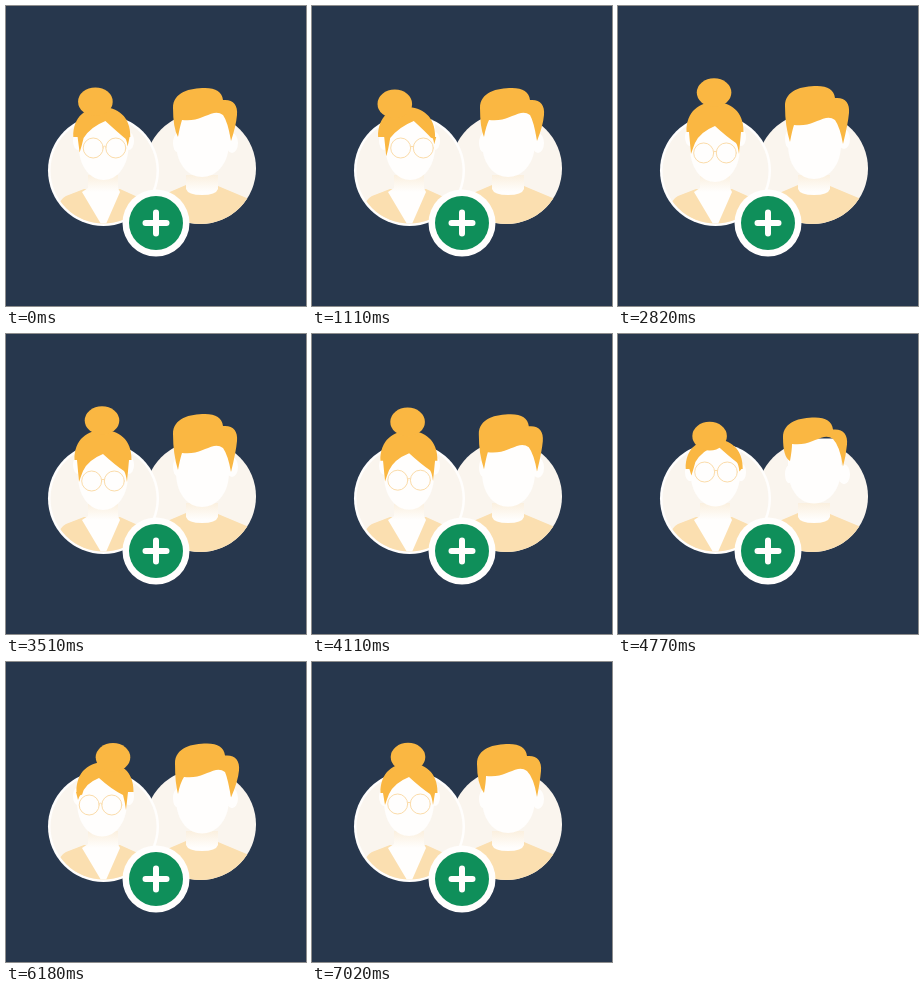
An HTML page with a canvas for the animation above (7.05 s loop, 300 by 300 pixels).

```html
<!DOCTYPE html>
<html lang="en">
<head>
<meta charset="utf-8">
<title>Add people</title>
<style>
html, body { margin: 0; width: 100%; height: 100%; overflow: hidden; background: #27374d; }
canvas { display: block; width: 100vw; height: 100vh; }
</style>
</head>
<body>
<canvas id="stage" width="300" height="300"></canvas>
<script>
const ctx = document.getElementById('stage').getContext('2d');
const LOOP = 7050, STEP = 30;
const WHITE = '#fffefd', CREAM = '#faf5ee', CLOTH = '#fbdfb0', HAIR = '#fab742', GREEN = '#0f8f5a';

// Where the heads point: turn of hers, shared nod (1 is down), turn of his
const looks = [
  { t: 0, her: -.6, nod: 0, his: 0 },
  { t: 1110, her: -1.2, nod: 0, his: .5 },
  { t: 2190, her: 1, nod: -.8, his: -.5 },
  { t: 2850, her: 0, nod: 1, his: 0 },
  { t: 3950, her: 0, nod: 1, his: 0 },
  { t: 4770, her: -.4, nod: -.8, his: -1 },
  { t: 6180, her: 1, nod: .2, his: 1 },
  { t: 7020, her: 0, nod: 0, his: -1 },
];

function lookAt(t) {
  const i = Math.max(1, looks.findIndex(k => k.t >= t));
  const a = looks[i - 1], b = looks[i];
  const e = (1 - Math.cos(Math.PI * (t - a.t) / (b.t - a.t))) / 2;
  const mix = part => a[part] + (b[part] - a[part]) * e;
  return { her: mix('her'), nod: mix('nod'), his: mix('his') };
}

function fill(d, color) {
  ctx.fillStyle = color;
  ctx.fill(new Path2D(d));
}

function oval(x, y, rx, ry, color) {
  ctx.fillStyle = color;
  ctx.beginPath();
  ctx.ellipse(x, y, rx, ry, 0, 0, 7);
  ctx.fill();
}

function disc(x, y, r, drawBody) {
  ctx.save();
  oval(x, y, r, r, CREAM);
  ctx.clip();
  drawBody();
  ctx.restore();
}

function shifted(x, y, draw) {
  ctx.save();
  ctx.translate(x, y);
  draw();
  ctx.restore();
}

// Skin below the chin, shaded at the top
function neckTone() {
  const tone = ctx.createLinearGradient(0, 169, 0, 186);
  tone.addColorStop(0, '#fbf0df');
  tone.addColorStop(1, WHITE);
  return tone;
}

function man(turn, nod) {
  disc(194.5, 162.5, 55.5, () => {
    fill('M180 179 L152 191 Q143 195 140 220 H254 Q250 197 243 193 L212 180Z', CLOTH);
    fill('M180 169 H212 V183 Q210 189 196 189 Q182 189 180 183Z', neckTone());
  });
  oval(171, 137 - 4 * nod, 4, 9, WHITE);
  oval(226, 137 - 4 * nod, 6, 10, WHITE);
  shifted(0, 2 * nod, () =>
    fill('M170 106 H223 V138 C222 160 209 171 196 171 C183 171 171 160 170 138Z', WHITE));

  const x = 199 + 2 * turn, top = 82 - 2 * nod, fringe = 114 + 5 * nod;
  const leftTip = 131 + 5 * nod, rightTip = 135 + 3 * nod;
  fill(`M172 ${leftTip} Q${x - 32} ${top + 40} ${x - 32} ${top + 20}
    C${x - 32} ${top + 4} ${x - 15} ${top} ${x} ${top}
    C${x + 11} ${top} ${x + 17} ${top + 4} ${x + 18} ${top + 12}
    C${x + 28} ${top + 11} ${x + 33} ${top + 17} ${x + 32} ${top + 27}
    Q${x + 31} ${top + 38} 225 ${rightTip}
    Q222 ${fringe + 2} ${x + 18} ${fringe - 5}
    Q${x + 14} ${fringe - 8} ${x + 9} ${fringe - 7}
    C${x} ${fringe - 5} ${x - 8} ${fringe + 2} ${x - 23} ${fringe}
    Q174 ${fringe + 6} 172 ${leftTip}Z`, HAIR);
}

function woman(turn, nod) {
  oval(97.5, 164.5, 55.5, 55.5, WHITE);
  disc(97.5, 164.5, 53, () => {
    fill('M78 183 L60 190 Q50 195 45 222 H150 Q144 199 134 192 L114 183Z', CLOTH);
    fill('M82 169 H112 V182 L114 186 L100 218 H95 L76 186 L82 182Z', neckTone());
  });
  for (const x of [72, 123]) oval(x, 135 - 4 * nod, 5, 9, WHITE);
  shifted(-turn, 2 * nod, () =>
    fill('M72 118 Q97 100 122 118 V141 C121 163 109 174 97 174 C85 174 73 163 72 141Z', WHITE));

  const eyeX = 97 - 2.5 * turn, eyeY = 142 + 5 * nod;
  ctx.strokeStyle = '#fbdcaa';
  ctx.lineWidth = 1;
  ctx.beginPath();
  for (const side of [-11.3, 11.3]) {
    ctx.moveTo(eyeX + side + 10, eyeY);
    ctx.arc(eyeX + side, eyeY, 10, 0, 7);
  }
  ctx.moveTo(eyeX - 1.5, eyeY - 1);
  ctx.quadraticCurveTo(eyeX, eyeY - 3, eyeX + 1.5, eyeY - 1);
  ctx.stroke();

  // Cap of hair, with a thin lock in front of each ear
  const x = 97 + 2 * turn, top = 101 - 5 * nod, rim = top + 30;
  const partX = 97 - 4 * turn, partY = 115 + 5 * nod;
  const leftX = 73 - turn, leftTip = 143 + 5 * nod - 6 * turn;
  const rightX = 121 - turn, rightTip = 143 + 5 * nod + 4 * turn;
  fill(`M${leftX} ${leftTip} L${leftX - 2} ${rim} L${x - 28.5} ${rim}
    C${x - 29} ${top + 9} ${x - 15} ${top} ${x} ${top}
    C${x + 15} ${top} ${x + 29} ${top + 9} ${x + 28.5} ${rim}
    L${rightX + 2} ${rim} L${rightX} ${rightTip}
    Q${rightX - 1} ${rightTip - 8} ${rightX - 3} ${partY + 17}
    Q${partX + 12} ${partY + 11} ${partX} ${partY}
    Q${partX - 15} ${partY + 6} ${leftX + 4} ${partY + 17}
    Q${leftX + 2} ${leftTip - 6} ${leftX} ${leftTip}Z`, HAIR);
  oval(96 + 11 * turn, 95 - 8.5 * nod + 2 * turn * turn, 17.3, 14.3, HAIR);
}

function button() {
  oval(150, 217, 33.5, 33.5, WHITE);
  oval(150, 217, 27, 27, GREEN);
  ctx.strokeStyle = WHITE;
  ctx.lineWidth = 6;
  ctx.lineCap = 'round';
  ctx.stroke(new Path2D('M139.5 217H160.5M150 206.5V227.5'));
}

const began = performance.now();
function draw() {
  const t = Math.max(0, performance.now() - began) % LOOP;
  const look = lookAt(Math.floor(t / STEP) * STEP);
  ctx.fillStyle = '#27374d';
  ctx.fillRect(0, 0, 300, 300);
  man(look.his, look.nod);
  woman(look.her, look.nod);
  button();
  requestAnimationFrame(draw);
}
draw();
</script>
</body>
</html>
```
